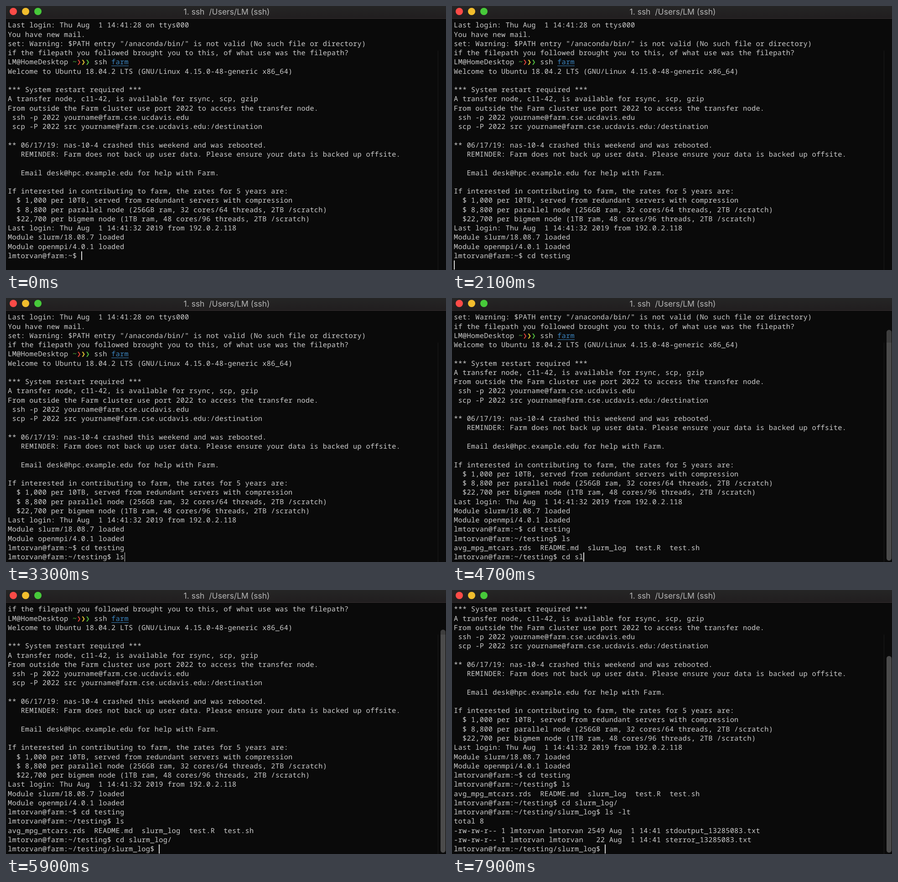
Write an HTML page that moves like this. It is 965 px wide and 580 px high and loops after 8 s.

```html
<!DOCTYPE html>
<html lang="en">
<head>
<meta charset="utf-8">
<title>Terminal session</title>
<style>
  html, body { margin: 0; width: 100%; height: 100%; overflow: hidden; background: #0a0a0a; }
  #stage { position: relative; width: 965px; height: 580px; overflow: hidden; background: #0a0a0a; }
  #bar {
    position: absolute; inset: 0 0 auto; height: 27px; border-bottom: 1px solid #393334;
    background: linear-gradient(#252525, #211e1f);
    font: 17.5px/26px Inter, Roboto, sans-serif; color: #b5b5b5;
    text-align: center; text-indent: 3px; white-space: pre;
  }
  #bar i { position: absolute; top: 4px; width: 16px; height: 16px; border-radius: 50%; }
  #screen {
    --cell: 9.463px; --row: 20.27px;
    position: absolute; left: 4px; top: 32.3px;
    font: 15.3px/var(--row) "Noto Sans Mono", "DejaVu Sans Mono", monospace;
    letter-spacing: calc(var(--cell) - 1ch);
    text-rendering: geometricPrecision; font-variant-ligatures: none;
    white-space: pre; color: #cdcdcd;
  }
  #screen div { position: relative; height: var(--row); }
  #screen b {
    display: inline-block; width: var(--cell); height: 20px; vertical-align: top;
    letter-spacing: 0; text-align: center;
  }
  #screen u { color: #3b84bf; text-underline-offset: 3px; text-decoration-thickness: 1px; }
  .red { color: #e0443a; } .yellow { color: #e3c832; } .green { color: #52bd3f; }
  #screen i { position: absolute; top: 0; width: 1.6px; height: 19.5px; margin-left: .2px; background: #d8d8d8; }
  #edge { position: absolute; left: 947px; top: 98px; width: 1px; bottom: 0; background: #1b1b1b; }
  #thumb { position: absolute; left: 953px; width: 11px; bottom: 3px; border-radius: 5.5px; background: #4b4b4b; }
  #shade { position: absolute; left: 948px; right: 0; top: 28px; height: 70px; background: rgba(10, 10, 10, .2); }
</style>
</head>
<body>
<div id="stage">
  <div id="bar"><i style="left:8px;background:#fc4b47"></i><i style="left:35px;background:#f2bd2d"></i><i style="left:62px;background:#47c93a"></i>1. ssh  /Users/LM (ssh)</div>
  <div id="screen"></div>
  <div id="edge"></div>
  <div id="thumb"></div>
  <div id="shade"></div>
</div>
<script>
const LOOP = 8000, ROWS = 27;
const user = 'lmtorvan';
const prompt = dir => `${user}@farm:~${dir}$ `;
const arrow = color => `<b class="${color}">❯</b>`;

const banner = `Last login: Thu Aug  1 14:41:28 on ttys000
You have new mail.
set: Warning: $PATH entry "/anaconda/bin/" is not valid (No such file or directory)
if the filepath you followed brought you to this, of what use was the filepath?
LM@HomeDesktop <span class="green">~</span>${['red', 'yellow', 'green'].map(arrow).join('')} ssh <u>farm</u>
Welcome to Ubuntu 18.04.2 LTS (GNU/Linux 4.15.0-48-generic x86_64)

*** System restart required ***
A transfer node, c11-42, is available for rsync, scp, gzip
From outside the Farm cluster use port 2022 to access the transfer node.
 ssh -p 2022 yourname@farm.cse.ucdavis.edu
 scp -P 2022 src yourname@farm.cse.ucdavis.edu:/destination

** 06/17/19: nas-10-4 crashed this weekend and was rebooted.
   REMINDER: Farm does not back up user data. Please ensure your data is backed up offsite.

   Email desk@hpc.example.edu for help with Farm.

If interested in contributing to farm, the rates for 5 years are:
  $ 1,000 per 10TB, served from redundant servers with compression
  $ 8,800 per parallel node (256GB ram, 32 cores/64 threads, 2TB /scratch)
  $22,700 per bigmem node (1TB ram, 48 cores/96 threads, 2TB /scratch)
Last login: Thu Aug  1 14:41:32 2019 from 192.0.2.118
Module slurm/18.08.7 loaded
Module openmpi/4.0.1 loaded
`;

const file = (size, name) => `-rw-rw-r-- 1 ${user} ${user} ${size} Aug  1 14:41 ${name}_13285083.txt\n`;

// [time in ms, text added to the terminal]
const steps = [
  [0, banner + prompt('')],
  [700, 'c'], [900, 'd'], [1000, ' '], [1100, 't'], [1200, 'e'],
  [1400, 's'], [1500, 't'], [1600, 'i'], [1700, 'ng'],
  [2100, '\n'], [2200, prompt('/testing')],
  [2800, 'l'], [3000, 's'],
  [3500, '\n'],
  [3600, 'avg_mpg_mtcars.rds  README.md  slurm_log  test.R  test.sh\n' + prompt('/testing')],
  [4200, 'c'], [4300, 'd'], [4400, ' '], [4600, 's'], [4700, 'l'], [5000, 'urm_log/'],
  [5500, '\n'], [5600, prompt('/testing/slurm_log')],
  [6700, 'l'], [6800, 's'], [7000, ' '], [7200, '-'], [7400, 'l'], [7500, 't'],
  [7800, '\ntotal 8\n' + file('2549', 'stdoutput') + file('  22', 'sterror') + prompt('/testing/slurm_log')]
];

const screenEl = document.getElementById('screen');
const thumb = document.getElementById('thumb');
let shown = 0;

function render(count) {
  const lines = steps.slice(0, count).map(s => s[1]).join('').split('\n');
  const hidden = Math.max(0, lines.length - ROWS);
  lines[lines.length - 1] += '<i></i>';
  screenEl.innerHTML = lines.slice(hidden).map(l => `<div>${l}</div>`).join('');
  thumb.hidden = !hidden;
  thumb.style.top = 32 + 548 * hidden / lines.length + 'px';
}

const start = performance.now();
function tick() {
  const t = (performance.now() - start) % LOOP;
  const count = steps.filter(s => s[0] <= t).length;
  if (count !== shown) render(shown = count);
  requestAnimationFrame(tick);
}
tick();
</script>
</body>
</html>
```
